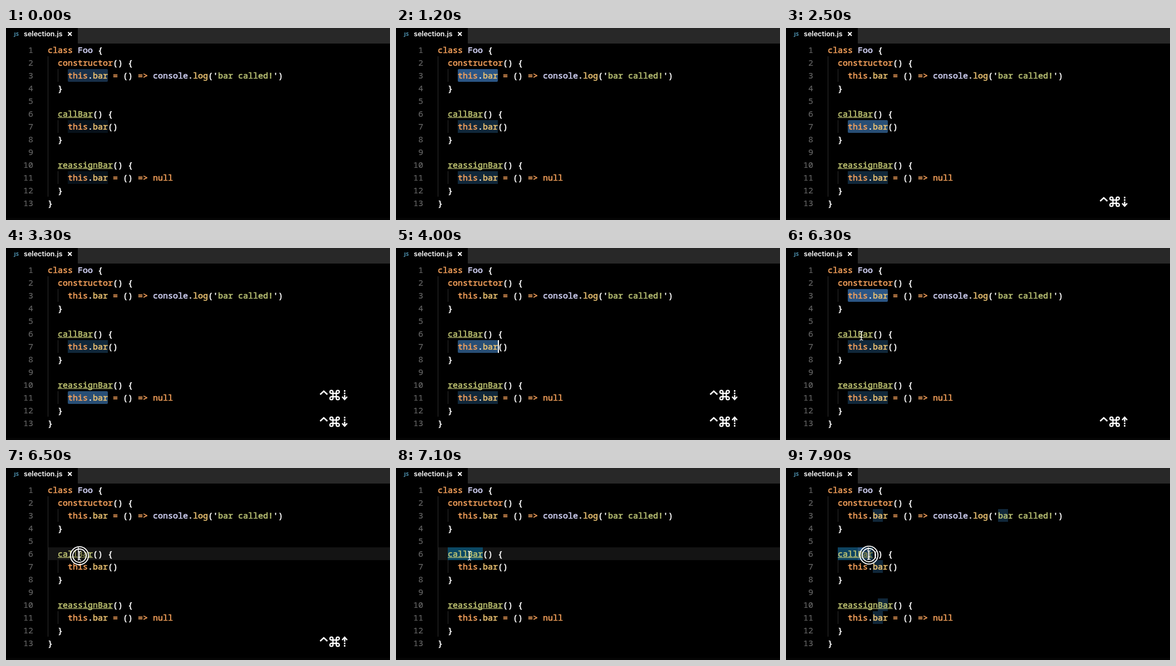
These frames come from a looping animation (690 px wide and 346 px high, 8000 ms). An HTML page:

```html
<!DOCTYPE html>
<html lang="en">
<head>
<meta charset="utf-8">
<title>Selection navigation</title>
<style>
  html, body { margin: 0; width: 100%; height: 100%; overflow: hidden; background: #000; }
  svg { display: block; width: 690px; height: 346px; }
  .code text { font: 400 15px "Noto Sans Mono", "DejaVu Sans Mono", monospace; stroke: currentColor; stroke-width: .55; fill: currentColor; }
  .code rect { fill: currentColor; }
  .code .number { color: #686868; text-anchor: end; stroke-width: .15; }
  .keyword { color: #f9a35c; }
  .member { color: #f0c674; }
  .method { color: #c3c874; }
  .string { color: #c0c878; }
  .name { color: #d6d6fb; }
  .plain { color: #fff; }
  .tab { font: 600 12.6px Inter, Roboto, sans-serif; fill: #fff; }
  .badge { font: 700 9.5px "Open Sans", sans-serif; fill: #519aba; }
  .key { fill: none; stroke: #fff; stroke-width: 2.5; }
</style>
</head>
<body>
<svg id="stage" viewBox="0 0 690 346">
  <defs>
    <g id="modifiers">
      <path d="M564.5 -1 L571 -7 L577.5 -1"/>
      <path d="M587.5 -3 H593.5 V3 H587.5 Z M587.5 -3 H584.8 A2.7 2.7 0 1 1 587.5 -5.7 Z M593.5 -3 V-5.7 A2.7 2.7 0 1 1 596.2 -3 Z M593.5 3 H596.2 A2.7 2.7 0 1 1 593.5 5.7 Z M587.5 3 V5.7 A2.7 2.7 0 1 1 584.8 3 Z" stroke-width="2.3"/>
    </g>
    <g id="arrow">
      <path d="M608.5 -9 V-6 M608.5 -4.5 V-1.5 M608.5 0 V7"/>
      <path d="M604 3 L608.5 8 L613 3"/>
    </g>
  </defs>
  <rect width="690" height="346"/>
  <rect x="129" width="561" height="28" fill="#282828"/>
  <rect y="342" width="690" height="4" fill="#050505"/>
  <text class="badge" x="14.5" y="14">JS</text>
  <text class="tab" x="32" y="15">selection.js</text>
  <path d="M111.5 7.5 L118 14 M118 7.5 L111.5 14" stroke="#fff" stroke-width="2"/>
  <g id="marks"></g>
  <path d="M75.5 51 V304 M93.5 74 V97 M93.5 166 V189 M93.5 258 V281" stroke="#2d2d2d" fill="none"/>
  <g id="code" class="code"></g>
  <rect id="caret" width="2" height="23" fill="#fff"/>
  <g id="keys" class="key"></g>
  <g id="mouse">
    <g id="ring" fill="none" stroke="#fff">
      <circle r="16.2" fill="#000" fill-opacity=".3" stroke-width="1.8"/>
      <circle r="12" stroke-width="1.8"/>
    </g>
    <path d="M-3 -8 Q0 -8 0 -5 Q0 -8 3 -8 M0 -6 V6 M-3 8 Q0 8 0 5 Q0 8 3 8 M-2 3 H2" fill="none" stroke="#e8e8e8" stroke-width="1.3"/>
  </g>
</svg>
<script>
const LOOP = 8000, LEFT = 75, CELL = 9, TOP = 28, PITCH = 23;
const $ = id => document.getElementById(id);
const colX = col => LEFT + col * CELL;
const lineY = line => TOP + (line - 1) * PITCH;
const clamp = v => Math.max(0, Math.min(1, v));

function add(parent, tag, attrs, text) {
  const node = document.createElementNS("http://www.w3.org/2000/svg", tag);
  for (const name in attrs) node.setAttribute(name, attrs[name]);
  if (text) node.textContent = text;
  return parent.appendChild(node);
}
const show = (node, on) => node.setAttribute("visibility", on ? "inherit" : "hidden");

const source = `class Foo {
  constructor() {
    this.bar = () => console.log('bar called!')
  }

  callBar() {
    this.bar()
  }

  reassignBar() {
    this.bar = () => null
  }
}`;

const rules = [
  ["string", /^\w+ \w+!$/],
  ["keyword", /^(class|constructor|this|null|=>?)$/],
  ["method", /^(callBar|reassignBar)$/],
  ["member", /^(bar|log)$/],
  ["name", /^(Foo|console)$/],
  ["plain", /./]
];

source.split("\n").forEach((row, i) => {
  const y = lineY(i + 1) + 16.5;
  add($("code"), "text", { class: "number", x: 49, y }, String(i + 1));
  for (const { 0: token, index } of row.matchAll(/\w+ \w+!|\w+|=>?|[^\s\w]/g)) {
    const kind = rules.find(([, pattern]) => pattern.test(token))[0];
    add($("code"), "text", { class: kind, x: colX(index), y }, token);
    if (kind === "method")
      add($("code"), "rect", { class: kind, x: colX(index), y: y + 1.5, width: token.length * CELL, height: 1 });
  }
});

function mark(line, col, length, fill, rx = 0) {
  return add($("marks"), "rect", { x: colX(col), y: lineY(line), width: length * CELL, height: PITCH, fill, rx });
}
const activeLine = add($("marks"), "rect",
  { x: LEFT, y: lineY(6), width: 690 - LEFT, height: PITCH, fill: "#141414" });
const uses = [3, 7, 11].map(line => ({
  line,
  match: mark(line, 4, 8, "#10273a"),
  selected: mark(line, 4, 8, line === 3 ? "#2a5585" : "#284e75", 2)
}));
const word = mark(6, 2, 7, "#0b4864");
const partial = [[3, 9], [3, 34], [7, 9], [10, 10], [11, 9]].map(([line, col]) => mark(line, col, 2, "#10273a"));
const dragged = mark(6, 6, 2, "#245078");

// Key presses: each moves the selection and pushes older captions up.
const LINGER = 2200, FADE = 150, ROW = 48;
const presses = [
  { at: 1700, down: true, line: 7 },
  { at: 2650, down: true, line: 11 },
  { at: 3850, down: false, line: 7 },
  { at: 4700, down: false, line: 3 }
];
for (const press of presses) {
  press.node = add($("keys"), "g", {});
  add(press.node, "use", { href: "#modifiers" });
  add(press.node, "use", { href: "#arrow", transform: press.down ? "" : "scale(1 -1)" });
}

const CLICK = 6500, DRAG = 7400;
const track = [[6000, 142, 166], [6250, 136, 158], [6450, 132, 158], [7450, 132, 158], [7850, 149, 157], [8000, 149, 157]];

function mouseAt(t) {
  const next = Math.max(1, track.findIndex(p => p[0] > t));
  const [a, b] = [track[next - 1], track[next]];
  const k = clamp((t - a[0]) / (b[0] - a[0]));
  const ease = k * k * (3 - 2 * k);
  return [a[1] + (b[1] - a[1]) * ease, a[2] + (b[2] - a[2]) * ease];
}

function render(t) {
  const done = presses.filter(p => p.at <= t);
  const last = done[done.length - 1] || { at: -600, line: 3 };
  const clicked = t >= CLICK;
  const [mx, my] = mouseAt(t);

  presses.forEach((p, i) => {
    const age = t - p.at;
    const row = done.length - 1 - i;
    show(p.node, age >= 0 && age < LINGER);
    p.node.setAttribute("opacity", clamp((LINGER - age) / FADE));
    p.node.setAttribute("transform", `translate(0 ${313 - ROW * row})`);
  });

  const fade = clamp(t / 300);
  for (const { line, match, selected } of uses) {
    const current = line === last.line;
    show(selected, !clicked && current);
    show(match, !clicked && !current && (line > 3 || last.line === 3));
    selected.setAttribute("opacity", 0.55 + 0.45 * fade);
    match.setAttribute("opacity", 0.45 + 0.55 * fade);
  }

  const count = t < DRAG ? 0 : mx >= 143 ? 2 : mx >= 134 ? 1 : 0;
  show(activeLine, clicked && !count);
  show(word, t >= CLICK + 250);
  word.setAttribute("fill", count ? "#0e4360" : "#0b4864");
  show(dragged, count);
  dragged.setAttribute("width", count * CELL);
  for (const box of partial) {
    show(box, count);
    box.setAttribute("width", count * CELL);
  }

  const moved = t >= DRAG ? t : clicked ? CLICK : last.at;
  show($("caret"), (t - moved) % 1000 < 500);
  $("caret").setAttribute("x", clicked ? colX(6 + count) : colX(12));
  $("caret").setAttribute("y", lineY(clicked ? 6 : last.line));

  show($("mouse"), t >= track[0][0]);
  show($("ring"), (clicked && t < CLICK + 150) || t >= DRAG);
  $("mouse").setAttribute("transform", `translate(${mx} ${my})`);
}

const start = performance.now();
function tick() {
  render((performance.now() - start) % LOOP);
  requestAnimationFrame(tick);
}
tick();
</script>
</body>
</html>
```
